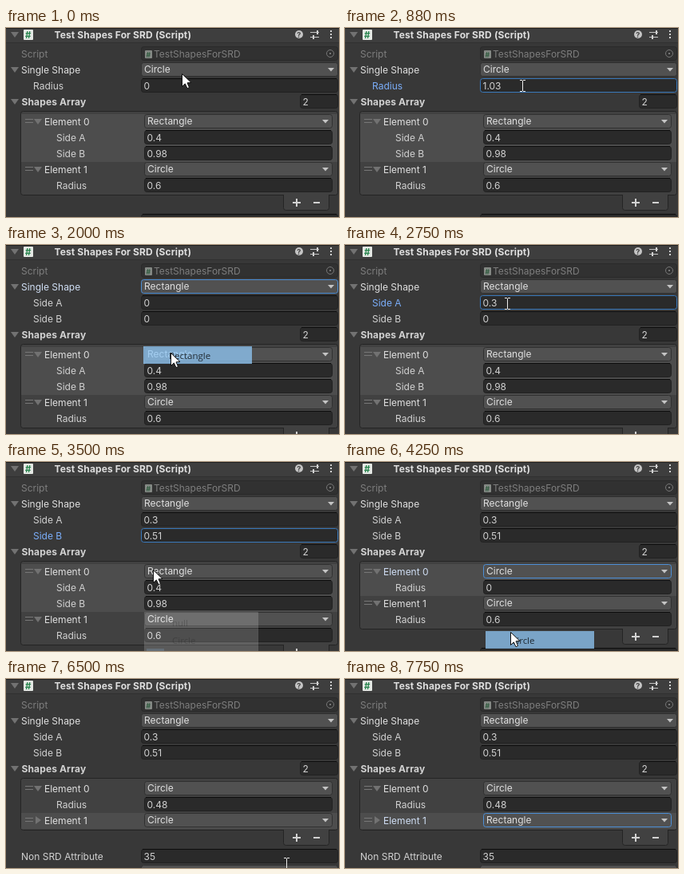
Write an HTML page with a canvas that moves like this. It is 417 px wide and 237 px high and loops after 7870 ms.

```html
<!DOCTYPE html>
<html lang="en">
<head>
<meta charset="utf-8">
<title>Shape inspector</title>
<style>
html, body { margin: 0; width: 100%; height: 100%; overflow: hidden; background: #383838; }
canvas { display: block; }
</style>
</head>
<body>
<canvas id="stage" width="417" height="237"></canvas>
<script>
const ctx = document.getElementById('stage').getContext('2d');
const LOOP = 7870, STEP = 125;
const TEXT = '#d2d2d2', BRIGHT = '#e0e0e0', DIM = '#7e7e7e';
const FOCUS_TEXT = '#7baefa', FOCUS_HEAD = '#d0dff5', FOCUS_LINE = '#3a79bb';
const UI = 'Inter, sans-serif', MENU = '"Open Sans", "Noto Sans", sans-serif';

// Each entry changes part of the inspector state from the given step on.
const changes = [
  [0, { single: 'Circle', singleVals: ['0'], first: 'Rectangle', firstVals: ['0.4', '0.98'],
        second: 'Circle', open: true, selected: 0, focus: '' }],
  [2, { focus: 's0' }], [4, { singleVals: ['1'] }], [5, { singleVals: ['1.'] }],
  [6, { singleVals: ['1.0'] }], [7, { singleVals: ['1.03'] }],
  [16, { single: 'Rectangle', singleVals: ['0', '0'], focus: 'single' }],
  [18, { focus: 's0' }], [21, { singleVals: ['0.', '0'] }], [22, { singleVals: ['0.3', '0'] }],
  [23, { focus: 's1' }], [24, { singleVals: ['0.3', '0.'] }],
  [25, { singleVals: ['0.3', '0.5'] }], [26, { singleVals: ['0.3', '0.51'] }],
  [34, { first: 'Circle', firstVals: ['0'], focus: 'first' }],
  [38, { focus: 'f0' }], [40, { selected: 1 }], [42, { firstVals: ['0.'] }],
  [43, { firstVals: ['0.4'] }], [44, { firstVals: ['0.48'] }],
  [47, { focus: '' }], [49, { open: false }],
  [60, { second: 'Rectangle', focus: 'second' }]
];

// step, x, y; positions between two entries are interpolated.
const pointer = [
  [0, 220, 57], [2, 222, 72], [7, 222, 72], [9, 206, 55], [10, 202, 58], [12, 201, 97],
  [14, 206, 135], [16, 206, 135], [18, 203, 73], [22, 203, 73], [23, 200, 92], [26, 198, 92],
  [28, 184, 135], [29, 185, 139], [30, 190, 162], [32, 207, 213], [34, 207, 213],
  [38, 205, 158], [44, 205, 158], [47, 68, 194], [48, 41, 179], [49, 41, 179],
  [52, 351, 231], [54, 235, 179], [55, 232, 182], [57, 225, 245], [63, 225, 245]
];

// from / picked: steps of opening and choosing.
const menus = [
  { x: 169, y: 82, from: 10, picked: 16, checked: 1, choice: 2 },
  { x: 173, y: 189, from: 28, picked: 34, checked: 2, choice: 1 },
  { x: 174, y: 229, from: 55, picked: 60, checked: 1, choice: 2 }
];

function rect(x, y, w, h, fill, stroke, radius = 0) {
  ctx.beginPath();
  ctx.roundRect(x, y, w, h, radius);
  if (fill) { ctx.fillStyle = fill; ctx.fill(); }
  if (stroke) { ctx.strokeStyle = stroke; ctx.lineWidth = 1; ctx.stroke(); }
}

function poly(points, fill, stroke, close = true) {
  ctx.beginPath();
  points.forEach(([x, y]) => ctx.lineTo(x, y));
  if (close) ctx.closePath();
  if (fill) { ctx.fillStyle = fill; ctx.fill(); }
  if (stroke) { ctx.strokeStyle = stroke; ctx.stroke(); }
}

function ring(x, y, r, color) {
  ctx.beginPath();
  ctx.arc(x, y, r, 0, 7);
  ctx.strokeStyle = color;
  ctx.stroke();
}

function text(str, x, midY, color = TEXT, font = '12px ' + UI) {
  ctx.font = font;
  ctx.fillStyle = color;
  ctx.fillText(str, x, midY + 5);
}

function heading(str, x, midY, color = TEXT) {
  ctx.letterSpacing = '0.13px';
  text(str, x, midY, color, 'bold 12px ' + UI);
  ctx.letterSpacing = '0px';
}

function foldout(x, y, open = true) {
  poly(open ? [[x - 5, y - 3], [x + 5, y - 3], [x, y + 4]]
            : [[x - 3, y - 5], [x + 4, y], [x - 3, y + 5]], '#727272');
}

function field(x, right, y, value, focused) {
  rect(x + .5, y - 8.5, right - x - 1, 17, '#2a2a2a', focused ? FOCUS_LINE : '#212121', 3);
  if (!focused) rect(x + 2, y - 9, right - x - 4, 1, '#0d0d0d');
  text(value, x + 3.5, y);
}

function dropdown(x, right, y, value, focused) {
  rect(x + .5, y - 8.5, right - x - 1, 17, '#515151', focused ? '#4d8fd6' : '#303030', 3);
  text(value, x + 4, y - 1, BRIGHT);
  poly([[right - 13, y - 2], [right - 5, y - 2], [right - 9, y + 2.5]], '#c4c4c4');
}

function properties(shape, values, key, x, fieldX, right, y, focus) {
  const names = shape === 'Circle' ? ['Radius'] : ['Side A', 'Side B'];
  names.forEach((name, i) => {
    const focused = focus === key + i;
    text(name, x, y + i * 20, focused ? FOCUS_TEXT : TEXT);
    field(fieldX, right, y + i * 20, values[i], focused);
  });
  return y + names.length * 20;
}

function scriptIcon(x, y, size, page, mark) {
  rect(x, y, size, size + 1, page, null, 1);
  text('#', x + size * .17, y + size * .6 - 1.7, mark, `bold ${size * .95}px ${UI}`);
}

function header() {
  rect(0, 0, 417, 18, '#3e3e3e');
  rect(0, 0, 417, 1, '#1f1f1f');
  rect(0, 18, 417, 1, '#303030');
  foldout(11, 8);
  scriptIcon(22, 2, 12, '#e4e8e4', '#23824a');
  heading('Test Shapes For SRD (Script)', 60.5, 8, '#dedede');
  rect(362, 3, 10, 10, '#c4c4c4', null, 5);
  text('?', 364.3, 7, '#3e3e3e', 'bold 9px ' + UI);
  ctx.lineWidth = 1;
  [[5, 389], [11, 384]].forEach(([y, knob]) => {
    poly([[381, y + .5], [392, y + .5]], null, '#c4c4c4', false);
    rect(knob, y - 2, 2, 5, '#d2d2d2');
  });
  [3, 7, 11].forEach(y => rect(406, y, 2, 2, '#d2d2d2'));
}

function scriptRow() {
  text('Script', 19, 32, DIM);
  rect(169.5, 23.5, 246, 17, '#313131', '#292929', 3);
  scriptIcon(174, 28, 9, '#858985', '#315c40');
  text('TestShapesForSRD', 185, 32, DIM);
  ctx.lineWidth = 1;
  ring(406, 32, 4.5, '#777');
  rect(405, 31, 2, 2, '#777');
}

function element(name, key, shape, values, y, s, open, selected) {
  const count = open ? (shape === 'Circle' ? 2 : 3) : 1;
  if (selected) rect(19, y - 9, 396, count * 20, '#4d4d4d');
  [-2, 2].forEach(dy => rect(24, y + dy - 1, 10, 1, '#777'));
  foldout(40, y, open);
  text(name, 48, y, s.focus === key ? FOCUS_HEAD : BRIGHT);
  dropdown(173, 409, y, shape, s.focus === key);
  return open ? properties(shape, values, key === 'first' ? 'f' : 'e', 63, 173, 409, y + 20, s.focus) : y + 20;
}

function shapesArray(s, y) {
  foldout(11, y);
  heading('Shapes Array', 19.5, y);
  field(368, 416, y, '2');
  const top = y + 12;
  const rows = (s.first === 'Circle' ? 2 : 3) + (s.open ? 2 : 1);
  const bottom = top + 5 + rows * 20;
  rect(347.5, bottom - 3.5, 57, 23, '#414141', '#242424', 3);
  rect(18.5, top + .5, 397, bottom - top, '#414141', '#242424', 3);
  const next = element('Element 0', 'first', s.first, s.firstVals, top + 13, s, true, s.selected === 0);
  element('Element 1', 'second', s.second, ['0.6'], next, s, s.open, s.selected === 1);
  const mid = bottom + 10;
  rect(348, bottom, 56, 3, '#414141');
  rect(359, mid - 1, 10, 2, '#d2d2d2');
  rect(363, mid - 5, 2, 10, '#d2d2d2');
  rect(385, mid - 1, 8, 2, '#d2d2d2');
  return bottom + 33;
}

function menuItem(menu, name, i, lit) {
  const y = menu.y + 1 + i * 22;
  if (lit) rect(menu.x + 3, y, 136, 22, '#91c9f7');
  text(name, menu.x + 35, y + 11, '#000', '11.5px ' + MENU);
}

function drawMenu(menu, step, y) {
  const age = step - menu.from, gone = step - menu.picked;
  if (age < 0 || gone > 1) return;
  const items = ['null', 'Circle', 'Rectangle'];
  ctx.save();
  if (gone >= 0) {
    ctx.globalAlpha = gone ? .2 : .75;
    menuItem(menu, items[menu.choice], menu.choice, true);
  } else {
    ctx.globalAlpha = age ? 1 : .18;
    rect(menu.x + .5, menu.y - .5, 142, 71, '#f2f2f2', '#b4b4b4');
    const hovered = Math.floor((y - menu.y - 1) / 22);
    items.forEach((name, i) => {
      menuItem(menu, name, i, i === hovered);
      if (i !== menu.checked) return;
      const cy = menu.y + 12 + i * 22;
      rect(menu.x + 3, cy - 11, 22, 22, '#91c9f7');
      ctx.lineWidth = 1.5;
      poly([[menu.x + 10, cy], [menu.x + 13, cy + 3], [menu.x + 19, cy - 4]], null, '#16334d', false);
    });
  }
  ctx.restore();
}

function pointerAt(step) {
  const i = Math.max(1, pointer.findIndex(p => p[0] >= step));
  const [s0, x0, y0] = pointer[i - 1], [s1, x1, y1] = pointer[i];
  const u = (step - s0) / (s1 - s0);
  return [x0 + (x1 - x0) * u, y0 + (y1 - y0) * u];
}

function drawPointer(x, y, beam) {
  ctx.save();
  ctx.translate(Math.round(x), Math.round(y));
  if (beam) {
    [-7, 7].forEach(end => {
      rect(-3, end, 3, 1, '#eee');
      rect(1, end, 3, 1, '#eee');
    });
    rect(0, -6, 1, 13, '#eee');
  } else {
    ctx.lineWidth = 1;
    poly([[.5, .5], [.5, 16.5], [4.3, 12.9], [7, 18.7], [9.5, 17.5], [7, 11.8], [12, 11.5]], '#fff', '#111');
  }
  ctx.restore();
}

function draw(step) {
  const s = Object.assign({}, ...changes.filter(c => c[0] <= step).map(c => c[1]));
  rect(0, 0, 417, 237, '#383838');
  header();
  scriptRow();
  foldout(11, 52);
  text('Single Shape', 19, 52, s.focus === 'single' ? FOCUS_HEAD : BRIGHT);
  dropdown(169, 416, 52, s.single, s.focus === 'single');
  const arrayY = properties(s.single, s.singleVals, 's', 34, 169, 416, 72, s.focus);
  const extraY = shapesArray(s, arrayY);
  text('Non SRD Attribute', 19, extraY);
  field(169, 416, extraY, '35');
  dropdown(169, 416, extraY + 20, '');

  const [x, y] = pointerAt(step);
  menus.forEach(menu => drawMenu(menu, step, y));
  const typing = [[2, 7], [18, 26], [37, 44], [52, 52]].some(([a, b]) => step >= a && step <= b);
  drawPointer(x, y, typing);
}

function frame(now) {
  draw(Math.floor((now % LOOP) / STEP));
  requestAnimationFrame(frame);
}
requestAnimationFrame(frame);
</script>
</body>
</html>
```
